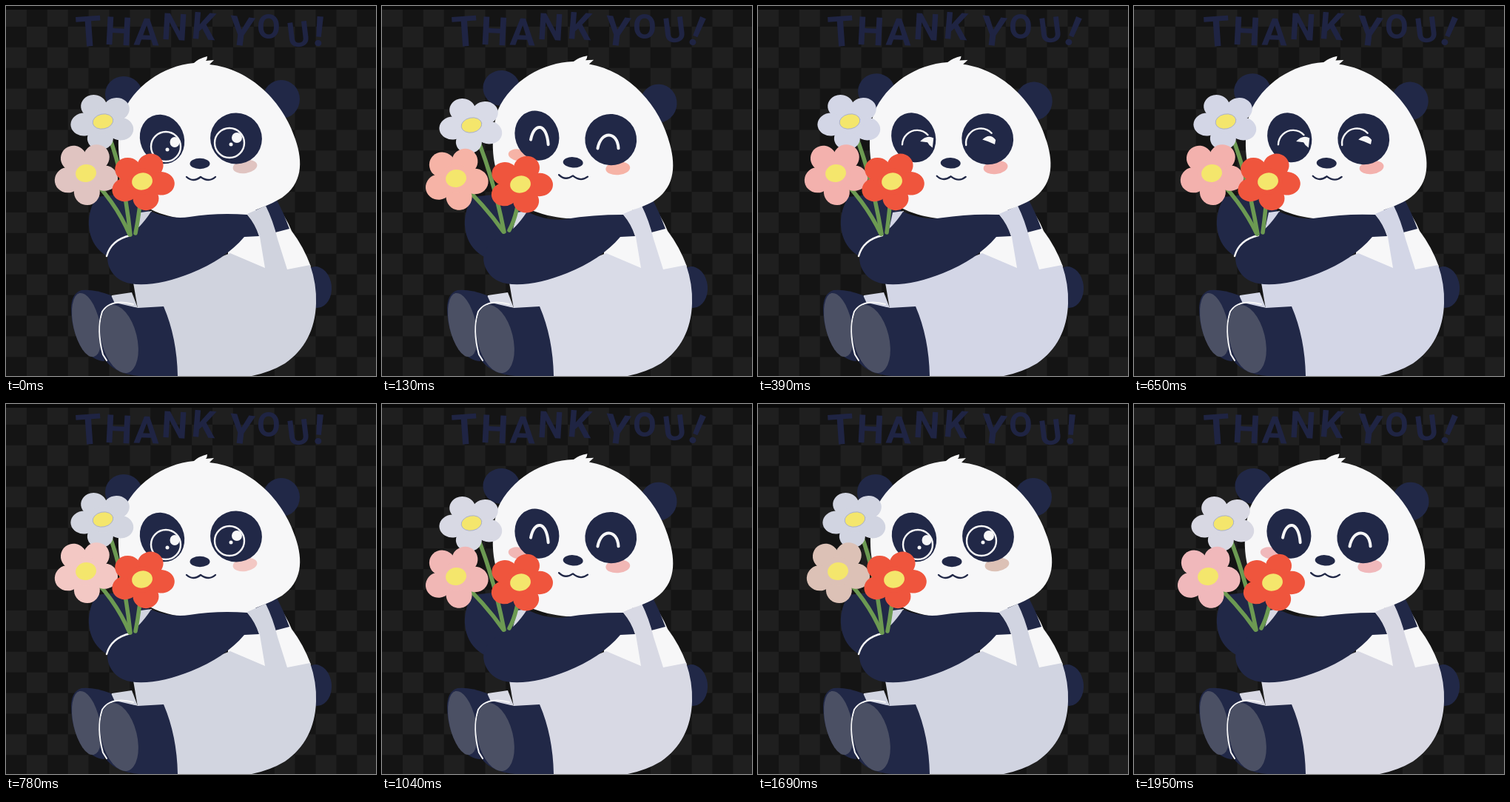
These frames come from a looping animation (500 by 500 pixels, 2080 ms). An HTML page with a canvas:

```html
<!DOCTYPE html>
<html lang="en">
<head>
<meta charset="utf-8">
<title>Thank you panda</title>
<style>
html, body { margin: 0; width: 100%; height: 100%; overflow: hidden; background: #141414; }
canvas { display: block; width: 100vw; height: 100vh; }
</style>
</head>
<body>
<canvas id="stage" width="500" height="500"></canvas>
<script>
const ctx = document.getElementById('stage').getContext('2d');
const LOOP = 2080;
const NAVY = '#212847', WHITE = '#f7f7f8', SOLE = '#4b5064';
const GREEN = '#6c9a52', YELLOW = '#f4e66c', RED = '#ef553d';

const POSES = {
  open: { tilt: 0, white: [131, 156], pink: [108, 226], red: [184, 237], grip: [167, 309], spin: 0 },
  half: { tilt: 1.7, white: [124, 156], pink: [105, 226], red: [181, 237], grip: [166, 308], spin: 0 },
  shut: { tilt: 3.7, white: [121, 161], pink: [100, 233], red: [187, 241], grip: [164, 305], spin: -6 }
};

// Start time, pose, blush colour, suit colour
const STEPS = [
  [0, 'open', '#e0c4c1', '#d0d3de'],
  [130, 'shut', '#f6b3a6', '#d9dbe7'],
  [390, 'half', '#f3b1ad', '#d3d6e6'],
  [780, 'open', '#f3c8c4', '#d2d5e0'],
  [1040, 'shut', '#f1b7b5', '#d8d9e4'],
  [1300, 'half', '#ecb1a7', '#dadae5'],
  [1690, 'open', '#dcc1b6', '#d1d4e1'],
  [1950, 'shut', '#f0b8bb', '#d8d8e3']
];

// Letter, centre x, centre y, size, angle
const LETTERS = [
  ['T', 112, 34, 57, -0.07], ['H', 152, 34, 53, 0.05], ['A', 190, 35, 51, 0.03],
  ['N', 228, 28, 50, 0.06], ['K', 267, 27, 51, 0.08], ['Y', 318, 34, 55, 0.12],
  ['O', 355, 28, 46, 0], ['U', 395, 38, 47, -0.12], ['!', 423, 34, 56, 0.08]
];

function fill(d, color) {
  ctx.fillStyle = color;
  ctx.fill(new Path2D(d));
}

function line(d, color, width) {
  ctx.strokeStyle = color;
  ctx.lineWidth = width;
  ctx.stroke(new Path2D(d));
}

function oval(x, y, rx, ry, color, angle = 0) {
  ctx.beginPath();
  ctx.ellipse(x, y, rx, ry, angle, 0, Math.PI * 2);
  ctx.fillStyle = color;
  ctx.fill();
}

function ring(x, y, r, from = 0, to = Math.PI * 2) {
  ctx.beginPath();
  ctx.arc(x, y, r, from, to);
  ctx.strokeStyle = WHITE;
  ctx.lineWidth = 2.4;
  ctx.stroke();
}

function drawBackdrop() {
  const cell = 27.9;
  ctx.fillStyle = '#141414';
  ctx.fillRect(0, 0, 500, 500);
  ctx.fillStyle = '#1f1f1f';
  for (let row = 0; row < 18; row++) {
    for (let col = row % 2; col < 18; col += 2) ctx.fillRect(col * cell, row * cell, cell, cell);
  }
  ctx.fillStyle = '#090909';
  ctx.fillRect(0, 0, 500, 5);
}

function drawGreeting(name) {
  const moved = name !== 'open';
  ctx.fillStyle = '#1f2443';
  ctx.textAlign = 'center';
  for (const [ch, x, y, size, angle] of LETTERS) {
    const lean = moved && ch === '!' ? 0.32 : 0;
    const lift = moved && ch === 'U' ? -6 : 0;
    ctx.save();
    ctx.translate(x + (lean ? 3 : 0), y + lift);
    ctx.rotate(angle + lean);
    ctx.font = `700 ${size}px Roboto, sans-serif`;
    ctx.fillText(ch, 0, size * 0.355);
    ctx.restore();
  }
}

// The head leans about its middle and drifts up a little as it goes.
function tiltHead(tilt) {
  ctx.translate(263 - tilt * 0.2, 165 - tilt * 0.4);
  ctx.rotate(tilt * Math.PI / 180);
  ctx.translate(-263, -165);
}

function drawBody(suit) {
  oval(419, 380, 21, 28, NAVY, -0.1);
  // Shirt, shoulder and suit
  fill('M300 270 L362 264 Q378 284 386 304 Q402 325 412 352 L380 366 L300 362 Z', WHITE);
  fill('M335 272 L366 262 Q376 281 383 301 L360 307 Z', NAVY);
  fill('M172 374 L250 355 L303 334 L350 354 L343 312 Q337 295 326 281 L351 270 Q361 290 367 315 L380 356 L411 350 Q420 376 419 402 C418 438 403 465 377 483 Q357 495 332 500 L228 500 L205 410 L178 409 Z', suit);
  // Far arm
  fill('M122 258 Q107 284 114 309 Q120 330 140 340 L200 320 L192 268 L150 255 Z', NAVY);
}

function drawLegs(suit) {
  fill('M143 391 L170 387 L178 408 L138 402 Z', suit);
  fill('M102 384 Q118 382 142 391 L148 404 L133 480 Q120 480 104 464 Q88 440 88 407 Q89 388 102 384 Z', NAVY);
  oval(109, 431, 18, 44, SOLE, -0.22);
  fill('M148 401 L178 408 L213 406 Q231 448 232 500 L180 500 Q150 498 135 480 Q122 450 127 422 Q131 403 148 401 Z', NAVY);
  line('M172 403 Q142 395 130 413 Q122 438 131 471 L136 479', WHITE, 2);
  oval(153, 450, 24, 47, SOLE, -0.24);
}

function drawEyes(name) {
  const patch = new Path2D();
  patch.ellipse(211, 180, 29.5, 34, -0.4, 0, Math.PI * 2);
  patch.ellipse(311, 179, 35, 34.5, 0.4, 0, Math.PI * 2);
  ctx.fillStyle = NAVY;
  ctx.fill(patch);
  ctx.save();
  ctx.clip(patch);
  if (name === 'open') {
    ring(216, 190, 20);
    ring(302, 185, 20);
    oval(228, 184, 6.5, 7, WHITE);
    oval(218, 194, 2.5, 2.5, WHITE);
    oval(312, 178, 7, 7, WHITE);
    oval(304, 187, 2.5, 2.5, WHITE);
  } else if (name === 'half') {
    ring(216, 190, 20, Math.PI, Math.PI * 1.75);
    ring(302, 185, 20, Math.PI * 0.95, Math.PI * 1.75);
    fill('M220 185 Q229 175 238 180 L237 193 Q232 190 230 186 Z', WHITE);
    fill('M304 180 Q314 170 322 180 L321 186 Q312 182 304 180 Z', WHITE);
  } else {
    line('M203 186 C206 162 223 162 227 191', WHITE, 4);
    line('M294 192 C297 167 319 167 322 190', WHITE, 4);
  }
  ctx.restore();
}

function drawHead(name, pose, blush) {
  ctx.save();
  tiltHead(pose.tilt);
  oval(159, 119, 25, 24, NAVY);
  oval(372, 126, 25, 26, NAVY);
  fill('M254 77 Q260 71 272 68 Q272 72 270 74 L281 73 L275 79 C331 85 375 130 391 180 C402 212 400 240 373 259 C340 279 300 287 258 289 C222 288 188 277 172 255 C153 230 147 188 156 149 C172 108 212 81 254 77 Z', WHITE);
  if (name === 'shut') oval(188, 208, 14, 8, blush, 0.1);
  oval(323, 217, 16.5, 9, blush, -0.15);
  drawEyes(name);
  oval(262, 213, 13.5, 7.2, NAVY);
  line('M244 231 Q253 239 263 231 Q274 239 283 231', NAVY, 2.3);
  ctx.restore();
}

function drawStem([x, y], [cx, cy], [gx, gy]) {
  line(`M${x} ${y} Q${cx} ${cy} ${gx} ${gy}`, GREEN, 5.5);
}

function drawFlower([x, y], color, start, squash, heart) {
  ctx.save();
  ctx.translate(x, y);
  ctx.scale(1, squash);
  for (let i = 0; i < 5; i++) {
    const a = (start + i * 72) * Math.PI / 180;
    oval(26 * Math.cos(a), 26 * Math.sin(a), 18, 17.5, color, a);
  }
  oval(0, 0, 20, 20, color);
  ctx.restore();
  oval(x, y, 14, heart, YELLOW, -0.2);
}

function drawBouquet(pose, blush, suit) {
  const { white, pink, red, grip, spin } = pose;
  drawStem(white, [white[0] + 27, white[1] + 59], [grip[0] + 1, grip[1]]);
  drawStem(pink, [pink[0] + 39, pink[1] + 36], grip);
  drawStem(red, [red[0] - 3, red[1] + 40], [grip[0] + 8, grip[1] - 2]);
  drawFlower(white, suit, -118, 0.88, 10);
  ctx.beginPath();
  ctx.ellipse(white[0], white[1], 14, 10, -0.2, 0, Math.PI * 2);
  ctx.strokeStyle = '#a9b0cf';
  ctx.lineWidth = 1;
  ctx.stroke();
  drawFlower(pink, blush, -129 + spin, 0.98, 12);
  drawFlower(red, RED, -65 + spin, 0.9, 11.5);
}

function drawNearArm(name, tilt) {
  const dip = tilt * 0.8;
  fill(`M165 310 Q180 302 196 278 Q225 ${289 + dip} 248 ${285 + dip} Q285 ${279 + dip} 326 282 Q337 295 342 311 L322 312 C304 333 280 349 250 361 C216 375 178 381 158 372 C139 363 134 343 139 332 Q146 316 165 310 Z`, NAVY);
  if (name !== 'shut') line('M136 338 Q142 316 168 310', WHITE, 2.4);
}

function draw(time) {
  const [, name, blush, suit] = STEPS.filter(s => s[0] <= time).pop();
  const pose = POSES[name];
  drawBackdrop();
  drawGreeting(name);
  drawBody(suit);
  drawLegs(suit);
  drawHead(name, pose, blush);
  fill('M182 279 L197 277 L192 302 L176 307 Z', suit);
  drawNearArm(name, pose.tilt);
  drawBouquet(pose, blush, suit);
}

ctx.lineCap = 'round';
ctx.lineJoin = 'round';
const began = performance.now();
function tick() {
  draw((performance.now() - began) % LOOP);
  requestAnimationFrame(tick);
}
tick();
</script>
</body>
</html>
```
